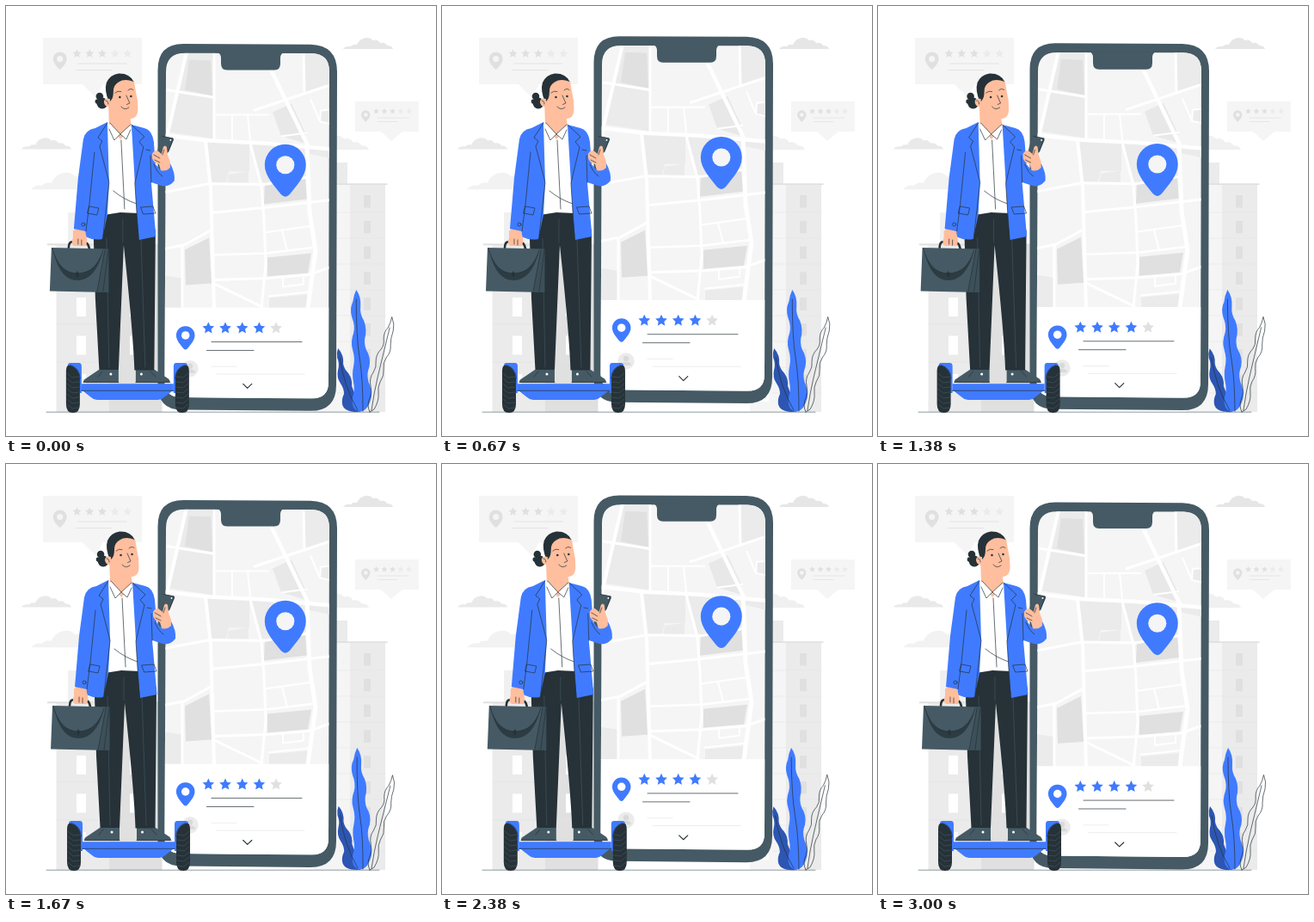
Animation of 500 by 500 pixels, one loop 3.04 s. Source, as an HTML page:

```html
<!DOCTYPE html>
<html lang="en">
<head>
<meta charset="utf-8">
<title>Rider and map</title>
<style>
html, body { margin: 0; width: 100%; height: 100%; overflow: hidden; background: #fff; }
svg { display: block; width: 100vw; height: 100vh; }
.line { fill: none; stroke: #263238; stroke-width: .7; stroke-linecap: round; stroke-linejoin: round; }
.road { fill: none; stroke: #fff; stroke-linejoin: round; }
</style>
</head>
<body>
<svg id="stage" viewBox="0 0 500 500" xmlns="http://www.w3.org/2000/svg"></svg>
<script>
const BLUE = '#407bff', DARK = '#263238', SLATE = '#455a64', SKIN = '#ffbe9d';
const G1 = '#f5f5f5', G2 = '#ebebeb', G3 = '#e0e0e0';
const LOOP = 3040, LEAD = 40;

const shape = (d, fill, extra = '') => `<path d="${d}" fill="${fill}" ${extra}/>`;
const line = (d, extra = '') => `<path d="${d}" class="line" ${extra}/>`;
const road = (d, width) => `<path d="${d}" class="road" stroke-width="${width}"/>`;
const stroke = (d, color, width) => `<path d="${d}" fill="none" stroke="${color}" stroke-width="${width}" stroke-linecap="round"/>`;
const rect = (x, y, w, h, fill, rx = 0) => `<rect x="${x}" y="${y}" width="${w}" height="${h}" rx="${rx}" fill="${fill}"/>`;
const dot = (x, y, r, fill) => `<circle cx="${x}" cy="${y}" r="${r}" fill="${fill}"/>`;

function star(x, y, r, fill) {
  const points = Array.from({ length: 10 }, (_, i) => {
    const a = -Math.PI / 2 + i * Math.PI / 5, q = i % 2 ? r * .48 : r;
    return `${(x + q * Math.cos(a)).toFixed(2)},${(y + q * Math.sin(a)).toFixed(2)}`;
  });
  return `<polygon points="${points.join(' ')}" fill="${fill}"/>`;
}
const stars = (x, y, r, gap, full, on, off) =>
  [0, 1, 2, 3, 4].map(i => star(x + i * gap, y, r, i < full ? on : off)).join('');

// Map marker with a round head of radius r and its tip 1.54 r below the centre.
function pin(x, y, r, fill, hole) {
  const d = `M${-r} 0A${r} ${r} 0 0 1 ${r} 0C${r} ${r * .55} ${r * .5} ${r * 1.05} ${r * .2} ${r * 1.44}
    Q0 ${r * 1.64} ${-r * .2} ${r * 1.44}C${-r * .5} ${r * 1.05} ${-r} ${r * .55} ${-r} 0Z`;
  return `<g transform="translate(${x} ${y})">${shape(d, fill)}${dot(0, 0, r * .44, hole)}</g>`;
}

function backdrop() {
  const cloud = (x, y, w, fill) => `<g transform="translate(${x} ${y}) scale(${w / 58})">` +
    shape('M0 13Q3 9 9 10Q11 7 16 8Q19 1 26 0Q31-1 35 3Q40 1 43 6Q49 5 51 9Q57 9 58 13Z', fill) + '</g>';
  const wins = (x, y, w, h, gap, n, fill) =>
    Array.from({ length: n }, (_, i) => rect(x, y + i * gap, w, h, fill)).join('');
  const rows = Array.from({ length: 8 }, (_, i) => stroke(`M385 ${240 + i * 30}H441`, '#e6e6e6', .7)).join('');
  const bands = [326, 370, 414].map(y => stroke(`M59 ${y}H180`, '#e3e3e3', .7)).join('');
  return cloud(392, 37, 58, '#e6e6e6') + cloud(18, 153.5, 58, '#e9e9e9') +
    cloud(29, 194, 86, '#f2f2f2') + cloud(350, 151, 72, '#f0f0f0') +
    shape('M43 37H158V91H113L104 106L89 91H43Z', G1) + pin(62.7, 61.5, 8, G3, G1) +
    stars(82.5, 55.5, 5.3, 14.7, 3, G3, G2) +
    stroke('M84 67H140M82 74.5H123', '#e3e3e3', 1) +
    shape('M406 111H480V146H461L448 157L436 146H406Z', G1) + pin(418.3, 126.5, 5.2, G3, G1) +
    stars(430.5, 122.5, 3.6, 9.5, 3, G3, G2) +
    stroke('M432 130H468M432 134.5H455', '#e3e3e3', .8) +
    rect(384, 182, 13, 26, G2) + rect(380, 208, 20, 264, G1) + rect(358, 460, 30, 12, G1) +
    rect(400, 208, 41, 264, G2) + rows + rect(384, 206.3, 59.5, 1.7, G3) +
    wins(416, 220, 8, 14.5, 29.8, 8, G3) +
    rect(72, 240, 45, 38, '#f0f0f0') + rect(58.5, 278, 61, 194, G2) +
    rect(119.5, 278, 62, 194, G3) + bands + rect(48, 276.3, 133, 2, G3) +
    wins(82, 339, 11, 22, 44.5, 3, '#fff') + wins(144, 339, 11, 22, 44.5, 2, '#fff') +
    stroke('M47 472.2H434', SLATE, .6);
}

function cityMap() {
  const blocks = [
    ['M211 54H241L242 155L189 147Z', G2], ['M213 63L238 64L240 105L208 98Z', G3],
    ['M347 54H378V93L348 102Z', G2], ['M310 124L332 114L348 148V160L320 152Z', '#e8e8e8'],
    ['M366 123Q371 121 378 123V139L364 136Z', G2],
    ['M232 158L283 161V193H259L256 206L236 207Z', G2], ['M259 196L282 193V206L257 207Z', G2],
    ['M285 161L350 165L353 201L298 206Z', G2], ['M301 206L348 200L350 225L300 231Z', G3],
    ['M350 166L378 168V178L351 172Z', G2],
    ['M208 284L236 270L239 323L209 325Z', G3], ['M184 314L204 317V352H184Z', G2],
    ['M304 293L355 288L351 311L304 315Z', G3], ['M306 340L350 336V352H306Z', G2]
  ].map(b => shape(...b)).join('');
  return blocks +
    road('M210 54L188 149L185 162', 4) + road('M187 98L243 107', 3) + road('M242 54V157', 3) +
    road('M184 151L236 157L300 160L378 167', 4.5) + road('M302 62L352 165', 4.5) +
    road('M346 54L347 104M288 122L348 102L378 92', 3) + road('M243 127H306M263 127V157M281 127L284 157', 2) +
    road('M354 109L365 135L378 138M365 135L366 122L378 121', 2) + road('M320 152L350 148', 2) +
    road('M232 157L238 212L242 352', 4) + road('M284 160L297 210L300 250L302 300L297 352', 3) +
    road('M184 217L237 207L300 208L354 199', 3) + road('M238 241L300 235L378 226', 3) +
    road('M350 164L353 240L360 285L351 352', 5) + road('M300 264L357 256M321 262L327 285', 2) +
    road('M184 283L208 278L239 261M205 280V352', 3) + road('M241 290L302 288L360 281', 2.5) +
    road('M241 323L299 351M241 319L304 317L352 313L378 304', 3) +
    road('M305 338L352 333M322 316V327L346 324V315', 2);
}

function phone() {
  const screen = 'M208 55.3L355 55.6Q376 56 376 77L375 438Q375 457 355 457L203 455.5Q184.5 455 184.5 437L186 77Q186 55.3 208 55.3Z';
  return shape('M206 44.6L354 45.2Q385 46 385 77L384 441Q384 471.4 354 471.4L204 470Q176.5 470 176.5 441V75Q176.5 44.6 206 44.6Z', SLATE) +
    `<clipPath id="screen"><path d="${screen}"/></clipPath><g clip-path="url(#screen)">` +
    rect(180, 50, 200, 410, G1) + cityMap() + rect(180, 351.3, 200, 110, '#fff') + '</g>' +
    shape('M246 54.5Q250 56 250 61V67.5Q250 75 257 75H312Q319 75 319 67.5V61Q319 56 323 54.5Z', SLATE) +
    pin(324.8, 185.3, 24, BLUE, G1) + pin(208.7, 383.5, 10.8, BLUE, '#fff') +
    stars(235.3, 375.2, 7.2, 19.7, 4, BLUE, G3) +
    line('M239 391.1H344M233.5 401H288') +
    dot(214, 422.3, 9.7, G2) + dot(214, 419.3, 3.2, '#d9d9d9') + shape('M208 427.3Q208 423 214 423T220 427.3Z', '#d9d9d9') +
    stroke('M239 419.8H268M245 428.6H347', G2, .9) +
    line('M275.7 440L280.7 444.9L285.8 440', 'style="stroke-width:1.1"');
}

function board() {
  const treads = Array.from({ length: 7 }, (_, i) => `M71 ${427 + i * 6}L77 ${432 + i * 6}L85 ${431 + i * 6}`).join('');
  const wheel = shape('M72 418Q72 415 75 415H85Q88 415 88 419V450H78Z', BLUE) +
    shape('M70 425Q70 416 75 418Q85 421 86 433V463Q86 473 78 473T70 463Z', DARK) +
    stroke(treads, SLATE, .6) + line('M75 417.5Q86 421 86.3 433');
  return wheel + `<g transform="translate(283 0) scale(-1 1)">${wheel}</g>` +
    shape('M88 439.3H195V448H88Z', BLUE) +
    shape('M90 448H193L184 455Q181 458 177 458H106Q102 458 99 455Z', BLUE) +
    line('M88 447.3H195');
}

function body() {
  return shape('M108 423L91 434.5Q89 438 91 438H131L131 423Z', SLATE) +
    shape('M151 423V438H190Q192 436.5 189 433.5L173 423Z', SLATE) +
    line('M90 437.6H131M151 437.6H191M107 431L112 425M168 425L174 431') +
    dot(122, 428, 1.5, '#fff') + dot(157.5, 428, 1.5, '#fff') +
    shape('M113 238H168L174 262L172.5 423.5H149.5Q148 380 137 278L131 423H108.5L104 340L102 270Z', DARK) +
    stroke('M117 270L120 420M157 268L162 420M136 248V275', SLATE, .6) +
    shape('M118 136L146 138L155 241L133 240L114 243Z', '#fff') +
    line('M134 156L138 236M125 215Q137 225 152 230') +
    shape('M80 257H95L93 276Q88 281 78 277Z', SKIN) +
    shape('M118 135L104 142Q92 144 90 155L84 200L79 259L93 262L92 268Q102 273 112 271L118 243L120 205Z', BLUE) +
    shape('M146 138L161 142Q170 144 172 158L174 184L179 190L191 183Q197 194 196 203Q190 211 181 209L169 205L174.5 268L155 272L152 240Z', BLUE) +
    line('M103 170L97 231L93 262M118 136L107 153L112 157L109 163L120 205L113 267M146 138L161 152L155 158L160 164L150 206L154 268M163 167L168 168M168 174L169 205M172 184Q176 194 182 198M97 233L108 235L106 243L95 241ZM157 234L171 233L174 241L160 242Z') +
    `<circle cx="90" cy="254" r="2" class="line"/>`;
}

function hand() {
  return shape('M180 152.5Q181 151 183 151.5L193.5 153.5Q195.5 154 195 156L189 170L183 174L176 169Z', SLATE) +
    line('M182 151.5L194.5 153.9L189 169') + dot(191.5, 156, .9, '#fff') +
    shape('M170 172Q172 168 176 168L181 172L183 164Q185 161 187 164L188 173L191 181L191 188Q186 193 180 191L178 184Q170 181 170 176Z', SKIN) +
    line('M172 173L179 177M184 167L182 173M173 179L179 182');
}

function head() {
  return shape('M119 108L120 137Q127 147 133 155Q141 148 146 140L144 126Z', SKIN) +
    line('M121 136L133 149L126 156L120 143M145 138L133 149L140 155L145 144', 'style="fill:#fff"') +
    shape('M121 91Q135 82 149 87L151 99Q154 110 153.5 121Q153 130 146 131Q137 134 129 128Q122 123 120 108Z', SKIN) +
    dot(109, 105, 4.3, DARK) + dot(112, 113, 6.4, DARK) + dot(106.5, 111, 2.8, DARK) +
    shape('M120 112Q114 98 117 89Q121 80 131 78.5Q144 78 148.5 88Q138 84 131 88.5Q125 92 125 99Q125 107 122 110Z', DARK) +
    shape('M121 108Q114 106 114 112Q115 118 121 117Z', SKIN) +
    line('M127 101Q130 98 134 99.5M142 98Q145 95 148 97.5M140 104L144 113L140.5 114.5M134 117Q138 122 143 118M116 110Q119 110 119 114') +
    dot(132.5, 106, 1.3, DARK) + dot(145.5, 105, 1.3, DARK);
}

function briefcase() {
  return stroke('M73 281Q73 274 78 274H90Q96 275 97 282', DARK, 2.6) +
    shape('M78 261L92 263Q96 272 93 279H79Q75 274 78 270Z', SKIN) + line('M84 271V277M88 272V278') +
    shape('M53 281L119.5 282.5V333L51 331.5Z', SLATE) +
    shape('M115 282.5H119.5V333L106 332.5Z', DARK, 'opacity=".25"') +
    shape('M55 285Q63 319 83 319Q104 319 113 285Q104 311 83 311Q63 311 55 285Z', DARK, 'opacity=".75"') +
    line('M54 282Q62 311 83 311Q105 311 113 284M115 284L106 332M119 284L113 332') +
    shape('M83 308L85 312L83 316L81 312Z', DARK);
}

function plants() {
  return shape('M386 398Q393 406 392 416Q393 422 398 427Q403 434 402 442Q404 449 408 454L412 472Q393 473 391 463Q390 457 393 451Q393 445 389 439Q384 432 386 423Q388 416 385 409Q384 403 386 398Z', '#2d56b3') +
    shape('M407 330Q413 338 412 350Q411 358 416 366Q420 376 417 387Q416 396 421 404Q425 414 421 424Q419 432 423 441Q427 452 423 461Q419 472 410 472Q401 468 403 455Q406 446 404 438Q402 428 404 419Q406 410 403 400Q400 391 404 380Q406 372 402 362Q399 352 403 344Q404 336 407 330Z', BLUE) +
    line('M407 341Q407 385 411 409T415 471M388 409Q393 443 409 470') +
    line('M423 472Q419 464 423 456Q426 449 424 442Q422 433 427 426Q431 420 430 413Q430 405 436 399Q440 394 439 387Q439 379 444 374Q447 369 448.5 361.5Q452 370 450 378Q447 386 447 394Q448 402 442 409Q438 415 439 422Q440 430 435 437Q432 443 433 450Q434 459 428 469L423 472M446 374Q436 415 432 432T425 470');
}

document.getElementById('stage').innerHTML = backdrop() +
  `<g id="phone">${phone()}</g><g id="plants">${plants()}</g>` +
  `<g id="rider">${board()}${body()}${hand()}${head()}${briefcase()}</g>`;

const [phoneEl, plantsEl, riderEl] = ['phone', 'plants', 'rider'].map(id => document.getElementById(id));
const SHAKE = [0, -1, 2, -4, 4, -4, 4, -4, 2, -1, 0];

function shakeAt(p) {
  const i = Math.min(9, Math.floor(p * 10));
  return SHAKE[i] + (SHAKE[i + 1] - SHAKE[i]) * (p * 10 - i);
}
// Linear swing: 0, +1 at a quarter, -1 at three quarters.
const swing = p => p < .25 ? p * 4 : p < .75 ? 2 - p * 4 : p * 4 - 4;

function draw(ms) {
  const p = ((ms + LEAD) % LOOP) / LOOP;
  const half = (p * 2) % 1;
  const rise = 10 * (1 - Math.abs(1 - half * 2));
  phoneEl.setAttribute('transform', `translate(0 ${-rise})`);
  riderEl.setAttribute('transform', `translate(${shakeAt(p)} 0)`);
  plantsEl.setAttribute('transform', `rotate(${swing(half)} 418 472)`);
}

const start = performance.now();
function tick() {
  draw(performance.now() - start);
  requestAnimationFrame(tick);
}
draw(0);
requestAnimationFrame(tick);
</script>
</body>
</html>
```
